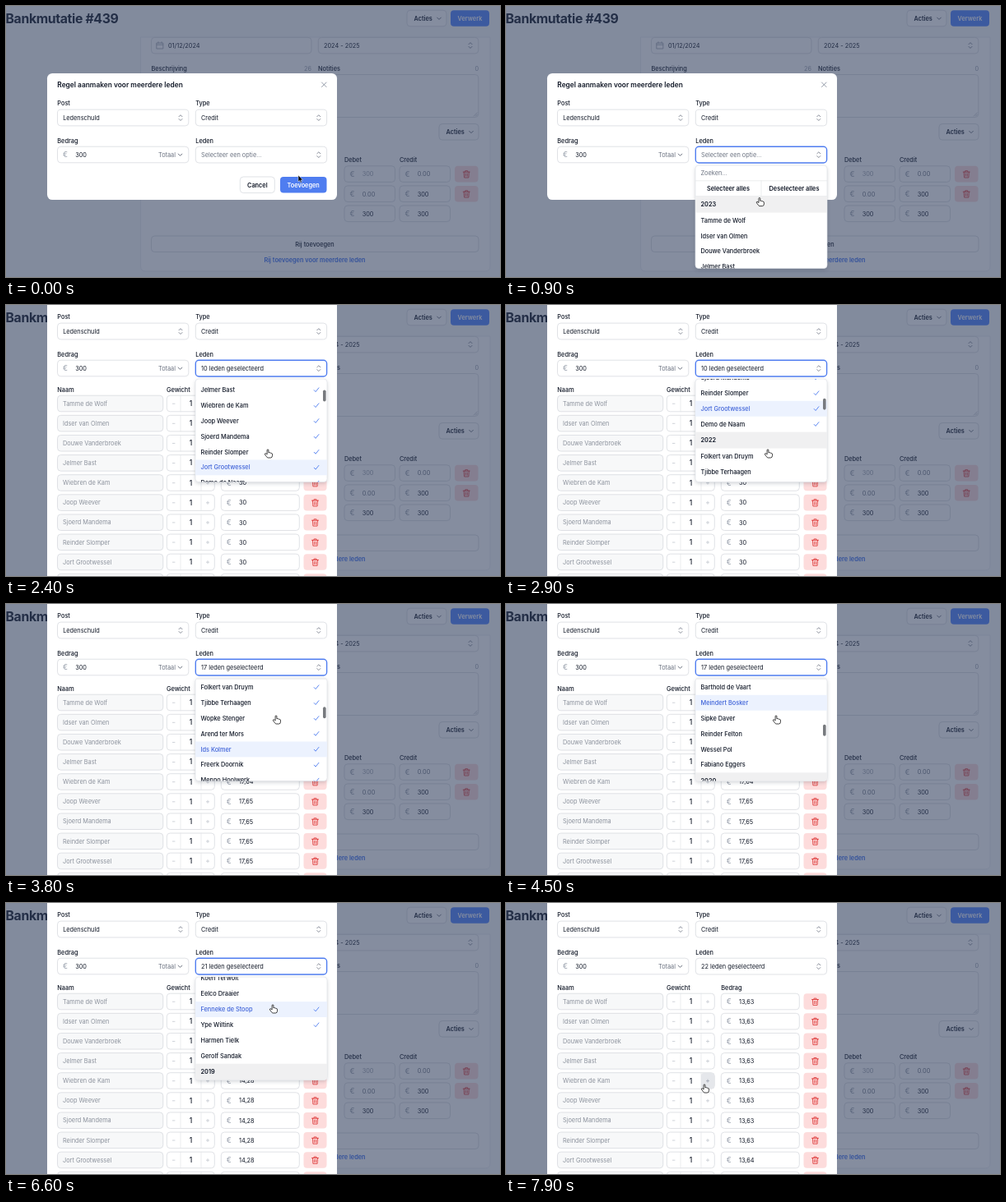
Write an HTML page that moves like this. It is 600 px wide and 330 px high and loops after 8000 ms.

```html
<!DOCTYPE html>
<html lang="nl">
<head>
<meta charset="utf-8">
<title>Bankmutatie</title>
<style>
html, body { margin: 0; width: 100%; height: 100%; overflow: hidden; background: #828b9d; }
svg { display: block; width: 600px; height: 330px; }
text { font: 400 7.33px Inter, sans-serif; white-space: pre; }
.m { font-weight: 500; }
.b { font-weight: 600; }
.c { text-anchor: middle; }
.r { text-anchor: end; }
.title { font-weight: 600; font-size: 8.38px; }
.h1 { font-weight: 700; font-size: 15.8px; letter-spacing: -.35px; }
.euro { font-size: 9px; }
.num { font-weight: 500; font-size: 8.4px; }
.drop { filter: drop-shadow(0 2px 2px rgba(15, 23, 42, .16)); }
</style>
</head>
<body>
<svg viewBox="0 0 600 330">
  <defs><clipPath id="list"><rect x="230" y="90" width="160" height="125.5" rx="4"/></clipPath></defs>
  <g id="page"></g>
  <rect width="600" height="330" fill="rgba(48,62,92,.59)"/>
  <g id="modal"></g>
  <g id="cursor"></g>
</svg>
<script>
const INK = '#111827', MID = '#6b7280', PALE = '#9ca3af', EDGE = '#d3d6dc',
      BLUE = '#4f7df0', RED = '#dc2f2f';

const groups = {
  2023: ['Tamme de Wolf', 'Idser van Olmen', 'Douwe Vanderbroek', 'Jelmer Bast', 'Wiebren de Kam',
         'Joop Weever', 'Sjoerd Mandema', 'Reinder Slomper', 'Jort Grootwessel', 'Demo de Naam'],
  2022: ['Folkert van Druym', 'Tjibbe Terhaagen', 'Wopke Stenger', 'Arend ter Mors', 'Ids Kolmer',
         'Freerk Doornik', 'Menno Hoolwerk'],
  2021: ['Barthold de Vaart', 'Meindert Bosker', 'Sipke Daver', 'Reinder Felton', 'Wessel Pol', 'Fabiano Eggers'],
  2020: ['Koen Terwolt', 'Eelco Draaier', 'Fenneke de Stoop', 'Ype Wiltink', 'Harmen Tielk', 'Gerolf Sandak'],
  2019: []
};

// Flat option list with the place of each row in the scrolled content
const options = [];
let rowY = 127.6;
for (const year of Object.keys(groups).reverse()) {
  options.push({ name: year, year, head: true, y: rowY, h: 20 });
  rowY += 20;
  for (const name of groups[year]) {
    options.push({ name, year, y: rowY, h: 18.9 });
    rowY += 18.9;
  }
}

// Timeline
const LOOP = 8000;
const OPEN = 500, CLOSE = 7200;
const picks = [[1300, '2023'], [3200, '2022'], [4800, 'Reinder Felton'], [5200, 'Wessel Pol'],
               [6200, 'Ype Wiltink'], [6500, 'Fenneke de Stoop'], [6800, 'Eelco Draaier']];
const hovers = [[0, ''], [2000, 'Jelmer Bast'], [2300, 'Sjoerd Mandema'], [2400, 'Jort Grootwessel'], [3100, ''],
                [3800, 'Ids Kolmer'], [4200, 'Meindert Bosker'], [4600, 'Sipke Daver'], [4700, 'Reinder Felton'],
                [5000, 'Wessel Pol'], [6000, 'Ype Wiltink'], [6400, 'Fenneke de Stoop'],
                [6700, 'Eelco Draaier'], [7000, '']];
const scrolls = [[0, 0], [2000, 0], [2700, 182], [3400, 182], [4400, 417], [5250, 417], [5600, 498], [5750, 498], [6000, 560]];
const bars = [[2100, 3100], [3400, 4700], [5300, 6300]];
const moves = [[0, 355, 206], [100, 352, 203], [400, 318, 183], [600, 318, 183], [1000, 306, 243], [1700, 306, 243],
               [2000, 318, 176], [2900, 318, 176], [3100, 318, 164], [3400, 318, 164], [3800, 328, 136],
               [4500, 328, 136], [4700, 326, 158], [4900, 326, 158], [5100, 324, 175], [5300, 324, 175],
               [5500, 324, 156], [5800, 324, 156], [6000, 324, 147], [6200, 324, 147], [6400, 324, 124],
               [6600, 324, 124], [6700, 322, 109], [6800, 322, 109], [7100, 146, 104], [7300, 146, 104],
               [7800, 241, 221]];
const hands = [[900, 1300], [1900, 7000], [7600, LOOP]];

const within = (spans, t) => spans.some(([a, b]) => t >= a && t < b);
const latest = (track, t) => track.filter(k => k[0] <= t).pop();

function along(track, t, i = 1) {
  const a = latest(track, t), b = track.find(k => k[0] > t);
  if (!b) return a[i];
  const p = (t - a[0]) / (b[0] - a[0]);
  return a[i] + (b[i] - a[i]) * p * p * (3 - 2 * p);
}

// Drawing helpers
const text = (x, y, s, cls = '', fill = INK) => `<text x="${x}" y="${y}" class="${cls}" fill="${fill}">${s}</text>`;
const box = (x, y, w, h, fill = '#fff', stroke = EDGE, r = 4, sw = .7) =>
  `<rect x="${x}" y="${y}" width="${w}" height="${h}" rx="${r}" fill="${fill}" stroke="${stroke}" stroke-width="${sw}"/>`;
const line = (x, y, d, stroke, w = .8) =>
  `<path transform="translate(${x} ${y})" d="${d}" fill="none" stroke="${stroke}" stroke-width="${w}" stroke-linecap="round" stroke-linejoin="round"/>`;
const updown = (x, y) => line(x, y, 'M-2-1.4l2-2 2 2M-2 1.4l2 2 2-2', MID);
const chevron = (x, y) => line(x, y, 'M-2.3-1.1L0 1.2l2.3-2.3', MID, 1);
const tick = (x, y) => line(x, y, 'M-2.8.3l1.9 2 3.8-4.8', BLUE, .9);
const trash = (x, y, w) => box(x, y, w, 19.6, '#fddcdc', 'none') +
  line(x + w / 2, y + 10, 'M-4-2.7h8M-1.5-2.8v-1.3h3v1.3M-3.1-2.7l.5 6.9h5.2l.5-6.9M-1-.8v3.2M1-.8v3.2', RED);
const money = (x, y, w, value, fill = INK) => box(x, y, w, 19.6) +
  text(x + 6.5, y + 13.1, '€', 'euro', PALE) + text(x + 21.7, y + 12.6, value, '', fill);

function drawPage() {
  const button = (x, y) => box(x, y, 48, 19.6) + text(x + 8.5, y + 12.5, 'Acties', 'b') + chevron(x + 39, y + 10);
  return box(-1, -1, 602, 332, '#f8fafc', 'none', 0) +
    '<path d="M163.5 38V317q0 6 6 6H582q6 0 6-6V38z" fill="#fff" stroke="#e5e8ed" stroke-width=".7"/>' +
    text(-.5, 20.5, 'Bankmutatie #439', 'h1') +
    button(487, 5.2) + box(540, 5.2, 47, 19.6, '#4f83ff', 'none') + text(563.5, 17.8, 'Verwerk', 'b c', '#fff') +
    box(176.5, 38.3, 194.5, 19.6) + text(197, 51, '01/12/2024') +
    line(187, 48, 'M-3.8-3h7.6v7h-7.6zM-3.8-.8h7.6M-2-4.3v1.5M2-4.3v1.5', PALE) +
    box(379.3, 38.3, 194.5, 19.6) + text(386, 51, '2024 - 2025') + updown(564, 48) +
    text(176.5, 79, 'Beschrijving', 'm') + text(371, 79, '26', 'r', PALE) +
    text(379, 79, 'Notities', 'm') + text(574, 79, '0', 'r', PALE) +
    box(176.5, 83.5, 194.5, 52) + box(379.3, 83.5, 194.5, 52) +
    line(572.3, 134, 'M-4 0l4-4M-1.8 0l1.8-1.8', PALE, .5) +
    button(526, 143.5) + text(411, 190, 'Debet', 'm') + text(478, 190, 'Credit', 'm') +
    [['300', '0.00'], ['0.00', '300'], ['300', '300']].map(([debet, credit], i) => {
      const y = 194.8 + i * 24.1, tone = v => v === '0.00' ? MID : INK;
      return money(411, y, 61.5, debet, i ? tone(debet) : PALE) + money(478, y, 61.5, credit, tone(credit)) +
        (i < 2 ? trash(545, y, 28.5) : '');
    }).join('') +
    box(176.5, 280, 397.5, 19.5) + text(375, 292.5, 'Rij toevoegen', 'm c') +
    text(375, 312, 'Rij toevoegen voor meerdere leden', 'b c', '#3b70f5');
}

function drawTable(t, count) {
  const share = Math.floor(30000 / count), low = count - 30000 % count;
  const euros = cents => cents % 100 ? (cents / 100).toFixed(2).replace('.', ',') : cents / 100;
  return text(62.3, 105.5, 'Naam', 'm') + text(195, 105.5, 'Gewicht', 'm') + text(261.3, 105.5, 'Bedrag', 'm') +
    groups[2023].map((name, i) => {
      const y = 110.2 + i * 24.12, hot = i === 4 && t >= 7700;
      return box(62.5, y, 128.3, 19.6, '#f7f8f9') + text(69, y + 12.5, name, '', '#8b919c') +
        box(195.3, y, 58, 19.6) +
        (hot ? box(237, y + .3, 16, 19, '#e5e7eb', 'none', 3) : '') +
        line(0, y, 'M212 0v19.6M237 0v19.6', '#e3e5e9', .7) +
        line(203.7, y + 10, 'M-1.3 0h2.6', '#c3c8d0') +
        line(245, y + 10, 'M-1.6 0h3.2M0-1.6v3.2', hot ? PALE : '#c3c8d0') +
        text(224.5, y + 12.9, 1, 'num c') +
        money(261.3, y, 95, euros(share + (i >= low))) + trash(361.5, y, 28);
    }).join('');
}

function drawList(t, chosen) {
  const s = along(scrolls, t), hot = latest(hovers, t)[1];
  let out = text(236.5, 101.5, 'Zoeken...', '', MID) +
    line(0, 0, 'M230 108.8H390M230 127.5H390M310 108.8V127.5', '#e3e5e9', .7) +
    text(270, 120.8, 'Selecteer alles', 'b c') + text(350, 120.8, 'Deselecteer alles', 'b c');
  for (const o of options) {
    const mid = o.y + o.h / 2, lit = o.name === hot;
    if (o.head || lit) out += box(230, o.y, 160, o.h, lit ? '#ecf2fe' : '#f0f0f1', 'none', 0);
    out += text(236.5, mid + 2.6, o.name, o.head ? 'b' : 'm', lit ? '#3f63d8' : INK);
    if (chosen(o)) out += tick(377, mid);
  }
  const thumb = within(bars, t) ? box(385, 88 + s * .141, 3.6, 14, '#777a7e', 'none', 1.8) : '';
  return `<g class="drop">${box(230, 90, 160, 125.5, '#fff', '#e0e3e8')}</g>` +
    `<g clip-path="url(#list)"><g transform="translate(0 ${-s})">${out}</g>${thumb}</g>`;
}

function drawModal(t) {
  const picked = picks.filter(p => p[0] <= t).map(p => p[1]);
  const chosen = o => picked.includes(o.name) || picked.includes(o.year);
  const count = options.filter(o => !o.head && chosen(o)).length;
  const opened = t >= OPEN && t < CLOSE;
  const select = (x, y, value, fill, focus) =>
    box(x, y, 159.3, 19.8, '#fff', focus ? BLUE : EDGE, 4, focus ? 1.4 : .7) +
    text(x + 6.7, y + 12.6, value, '', fill) + updown(x + 149.5, y + 10);
  const out = box(50, -22, 352, count ? 400 : 154, '#fff', 'none', 6.3) +
    text(62.3, -4.7, 'Regel aanmaken voor meerdere leden', 'title') +
    line(386.3, -8.2, 'M-2.8-2.8l5.6 5.6M2.8-2.8l-5.6 5.6', '#7d8696') +
    text(62.3, 17.3, 'Post', 'm') + select(62.5, 22.1, 'Ledenschuld') +
    text(230.3, 17.3, 'Type', 'm') + select(230.3, 22.1, 'Credit') +
    text(62.3, 62.5, 'Bedrag', 'm') + money(62.5, 67.2, 159.3, '300') +
    text(185, 79.8, 'Totaal', '', MID) + chevron(211.5, 77.2) +
    text(230.3, 62.5, 'Leden', 'm') +
    select(230.3, 67.2, count ? count + ' leden geselecteerd' : 'Selecteer een optie...', count ? INK : MID, opened) +
    (count ? drawTable(t, count) :
      box(284.3, 104, 42, 19.6) + text(305.3, 116.5, 'Cancel', 'b c') +
      box(333, 104, 56.5, 19.6, BLUE, 'none') + text(361.2, 116.5, 'Toevoegen', 'b c', '#fff')) +
    (opened ? drawList(t, chosen) : '');
  return `<g transform="translate(0 ${count ? 0 : 104})">${out}</g>`;
}

function drawCursor(t) {
  const hand = within(hands, t);
  const d = hand
    ? 'M-.9.8a.9.9 0 0 1 1.8 0V3.6q1.6-.5 1.7.5 1.5-.4 1.6.5 1.3-.2 1.3 1V7.5q0 2.3-2 2.5H.2q-1 0-1.7-1.3L-3.4 6.2q-.7-1.4.6-1.5 1 .2 1.9 1.3z'
    : 'M0 0v8l1.8-1.6 1.2 2.8 1.3-.6-1.2-2.7h2.5z';
  return `<path transform="translate(${along(moves, t)} ${along(moves, t, 2)})" d="${d}" ` +
    `fill="${hand ? '#fff' : '#000'}" stroke="${hand ? '#111' : '#fff'}" stroke-width="${hand ? .8 : .5}" stroke-linejoin="round"/>`;
}

const layer = id => document.getElementById(id);
layer('page').innerHTML = drawPage();

const start = performance.now();
let shown = -1;
function tickFrame() {
  const t = Math.floor((performance.now() - start) % LOOP / 100) * 100;
  if (t !== shown) {
    shown = t;
    layer('modal').innerHTML = drawModal(t);
    layer('cursor').innerHTML = drawCursor(t);
  }
  requestAnimationFrame(tickFrame);
}
tickFrame();
</script>
</body>
</html>
```
